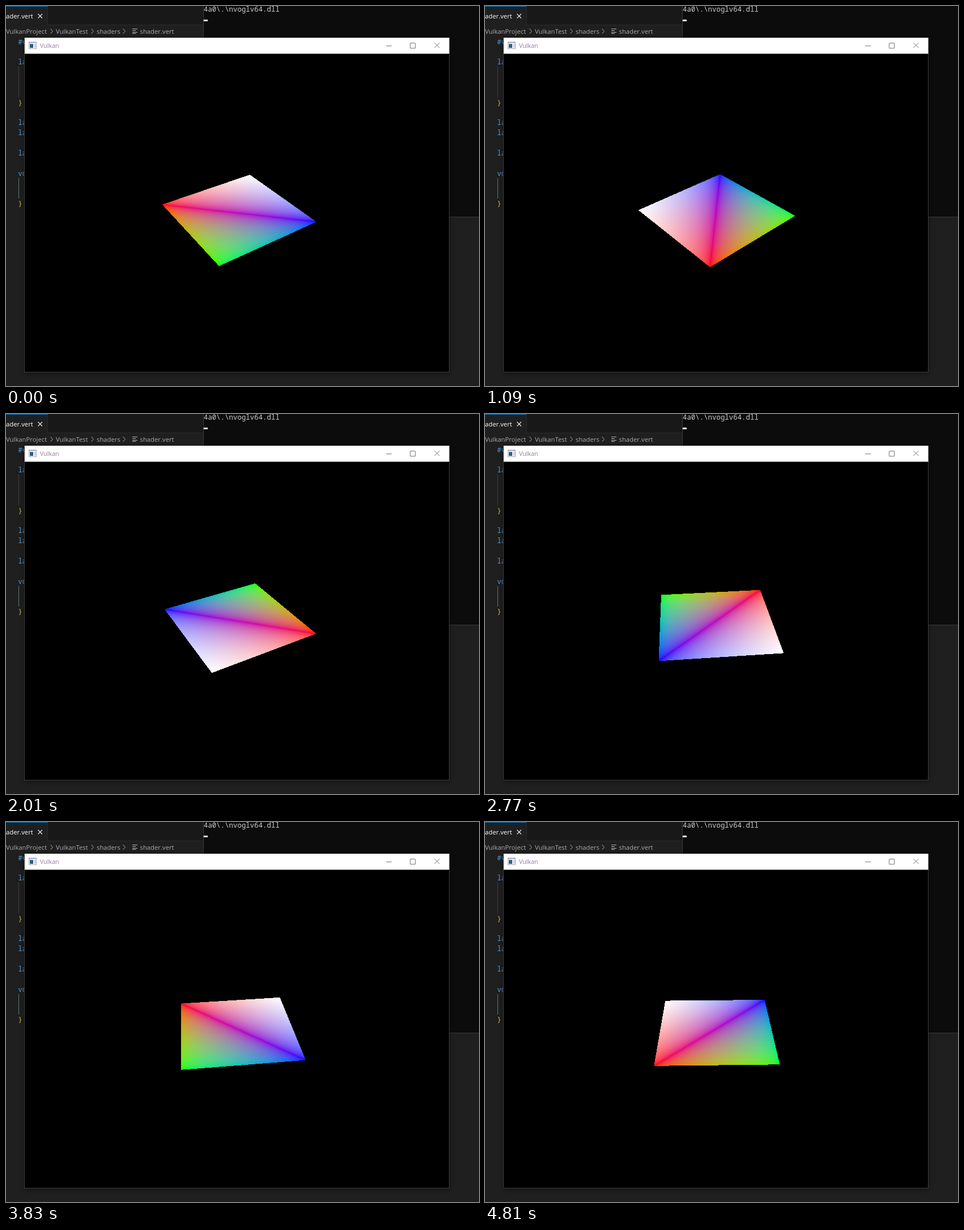
These frames come from a looping animation (835 px wide and 671 px high, 4.88 s). An HTML page with a canvas:

```html
<!DOCTYPE html>
<html lang="en">
<head>
<meta charset="utf-8">
<title>Rotating quad</title>
<style>
  html, body { margin: 0; width: 100%; height: 100%; overflow: hidden; background: #1f1f1f; }
  svg, canvas { position: absolute; left: 0; top: 0; }
  text { font: 11.3px "Open Sans", sans-serif; white-space: pre; }
  .mono { font: 12px "Noto Sans Mono", monospace; }
  .line { fill: none; stroke-width: 1; }
</style>
</head>
<body>
<svg width="835" height="671" viewBox="0 0 835 671">
  <!-- editor -->
  <rect width="835" height="671" fill="#1f1f1f"/>
  <rect x="74" width="275" height="33" fill="#181818"/>
  <path class="line" stroke="#2b2b2b" d="M73.5 0V33.5H348"/>
  <rect width="73" height="1" fill="#0078d4"/>
  <text x="0" y="22" fill="#fff">ader.vert</text>
  <path class="line" stroke="#e8e8e8" style="stroke-width:1.2" d="M56.5 14l7.5 7.5m0-7.5l-7.5 7.5"/>
  <g fill="#a9a9a9">
    <text x="0" y="48.5">VulkanProject</text>
    <text x="88" y="48.5">VulkanTest</text>
    <text x="160" y="48.5">shaders</text>
    <text x="236.5" y="48.5">shader.vert</text>
  </g>
  <path class="line" stroke="#a9a9a9" d="M78.5 40l4 4.5-4 4.5M150.5 40l4 4.5-4 4.5M206.5 40l4 4.5-4 4.5"/>
  <path class="line" stroke="#b8b8b8" d="M223 40.5h9M223 43.5h6M223 46.5h9M223 48.5h6"/>
  <g id="code"></g>
  <path class="line" stroke="#404040" d="M22.5 107V162"/>
  <path class="line" stroke="#65756f" d="M22.5 304V340"/>

  <!-- terminal -->
  <rect x="349" width="486" height="372" fill="#0c0c0c"/>
  <path class="line" stroke="#3a3a3a" d="M348.5 0V372.5H835"/>
  <text class="mono" style="font-size:12.4px" x="349" y="10" fill="#ccc">4a0\.\nvoglv64.dll</text>
  <rect x="349" y="24" width="7" height="3" fill="#f2f2f2"/>

  <!-- application window -->
  <rect x="32" y="56" width="751" height="591" style="filter:drop-shadow(0 2px 4px #0006)"/>
  <rect class="line" x="32.5" y="56.5" width="750" height="590" stroke="#3d3d3d"/>
  <rect x="33" y="56" width="749.5" height="28.3" fill="#fff"/>
  <rect class="line" x="40.5" y="63.5" width="13" height="12" stroke="#a9a5bd"/>
  <rect x="41" y="64" width="12" height="2" fill="#c9c5dc"/>
  <rect x="42" y="67" width="6" height="7" fill="#2f5f7d"/>
  <rect x="49" y="67" width="4" height="7" fill="#d9d9e6"/>
  <text x="60" y="74" fill="#94789f" style="font-size:10.7px">Vulkan</text>
  <path class="line" stroke="#777" d="M671 70.5h10M713.5 65.5h9v9h-9zM756.5 65l9 9m0-9l-9 9"/>
</svg>
<canvas id="quad" width="290" height="175" style="left:263px;top:292px"></canvas>

<script>
const code = document.getElementById('code');
const codeRows = [[0, '#v'], [2, 'la'], [6, '}'], [8, 'la'], [9, 'la'], [11, 'la'], [13, 'vo'], [16, '}']];
for (const [row, label] of codeRows) {
  const text = document.createElementNS('http://www.w3.org/2000/svg', 'text');
  text.setAttribute('class', 'mono');
  text.setAttribute('x', 21.5);
  text.setAttribute('y', 67.5 + row * 17.87);
  text.setAttribute('fill', label === '}' ? '#dcb94a' : '#569cd6');
  text.textContent = label;
  code.append(text);
}

const LOOP = 4880;
// Start and end of each run of eight evenly spaced steps, in ms.
const runs = [[70, 540], [610, 1090], [1180, 1660], [1730, 2210], [2280, 2770],
              [2840, 3330], [3400, 3900], [3970, 4460], [4530, 5020]];
const stepTimes = [0];
for (const [start, end] of runs)
  for (let k = 0; k < 8; k++) stepTimes.push(start + Math.round((end - start) * k / 70) * 10);

// Rotation in degrees at a few steps, linear in between (about 6 per step).
const turns = [[0, 79], [7, 121], [16, 176.4], [29, 254.4], [40, 320.5], [55, 411.8], [69, 496]];
function angleAt(step) {
  const i = Math.max(1, turns.findIndex(([n]) => n >= step));
  const [n0, a0] = turns[i - 1], [n1, a1] = turns[i];
  return (a0 + (a1 - a0) * (step - n0) / (n1 - n0)) * Math.PI / 180;
}

const canvas = document.getElementById('quad');
const ctx = canvas.getContext('2d');
const image = ctx.createImageData(canvas.width, canvas.height);
const centerX = 407.7 - 263, centerY = 365.4 - 292;
const focal = 281.25 / Math.tan(Math.PI / 8);

const srgb = c => 255 * (c <= 0.0031308 ? 12.92 * c : 1.055 * c ** (1 / 2.4) - 0.055);

// Casts a ray per pixel from an eye at (2, 2, 2) onto the unit square in the plane z = 0.
function drawQuad(angle) {
  const cos = Math.cos(angle), sin = Math.sin(angle), { data, width, height } = image;
  data.fill(0);
  for (let py = 0, i = 0; py < height; py++) {
    const viewY = (centerY - py - 0.5) / focal;
    const depth = Math.sqrt(12) / (1 - Math.SQRT2 * viewY);
    const sum = -Math.sqrt(6) * viewY * depth;
    for (let px = 0; px < width; px++, i += 4) {
      const diff = Math.SQRT2 * (px + 0.5 - centerX) / focal * depth;
      const x = (sum - diff) / 2, y = (sum + diff) / 2;
      const u = x * cos + y * sin + 0.5, v = y * cos - x * sin + 0.5;
      if (u < 0 || u > 1 || v < 0 || v > 1) continue;
      data[i] = srgb(1 - u);
      data[i + 1] = srgb(Math.abs(u - v));
      data[i + 2] = srgb(v);
      data[i + 3] = 255;
    }
  }
  ctx.putImageData(image, 0, 0);
}

let shown = -1;
const origin = performance.now();
function tick() {
  const time = (performance.now() - origin) % LOOP;
  const step = stepTimes.findLastIndex(t => t <= time);
  if (step !== shown) drawQuad(angleAt(Math.min(shown = step, 69)));
  requestAnimationFrame(tick);
}
tick();
</script>
</body>
</html>
```
